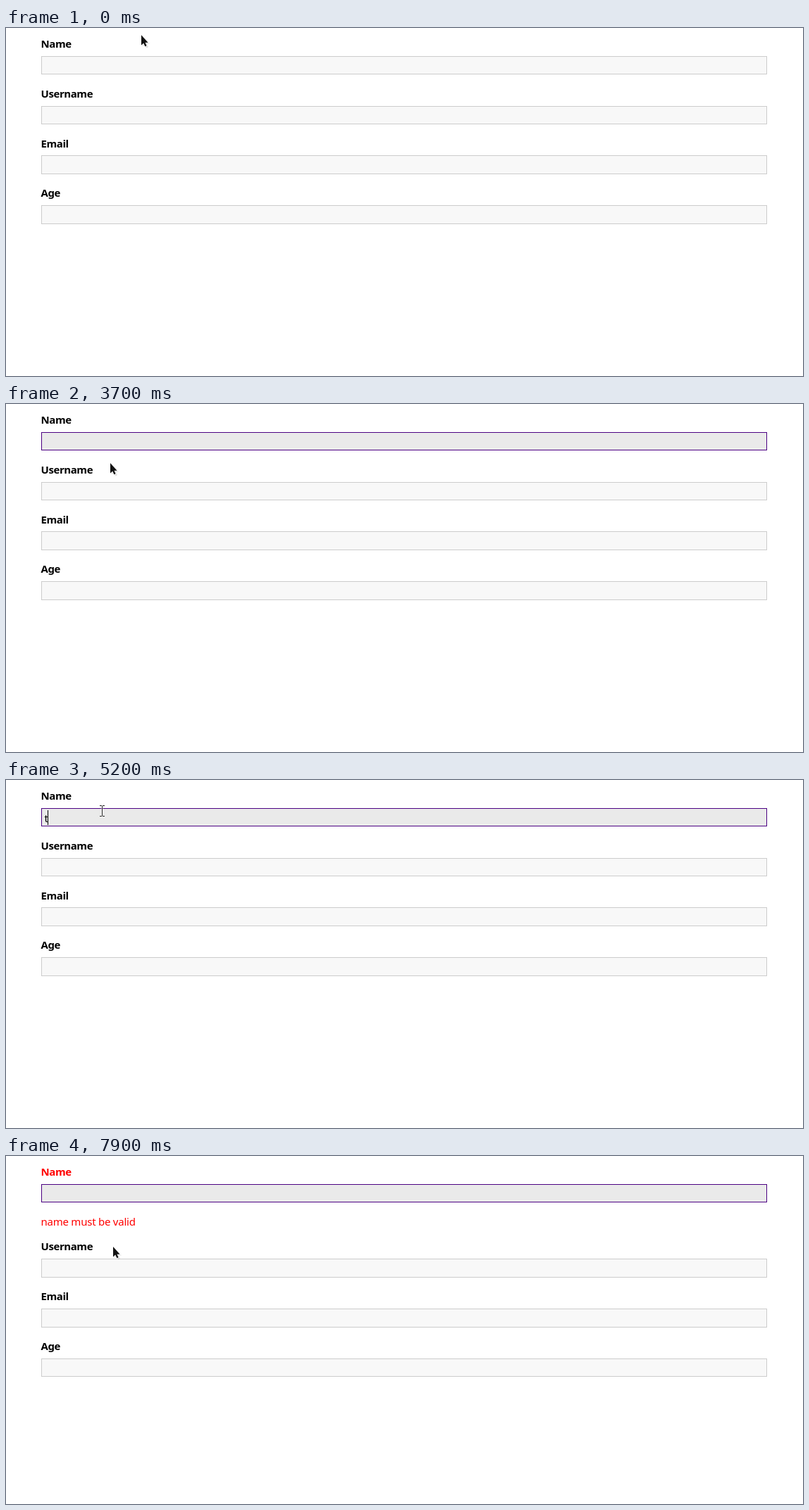
An HTML page that plays this animation: 1131x495 px, repeating every 8 s.

```html
<!DOCTYPE html>
<html lang="en">
<head>
<meta charset="utf-8">
<title>Form validation</title>
<style>
  html, body { margin: 0; width: 100%; height: 100%; overflow: hidden; background: #fff; }
  svg { display: block; width: 1131px; height: 495px; }
  text { font: 15px "Noto Sans", "Open Sans", sans-serif; letter-spacing: -.24px; }
  .label { font-weight: 700; letter-spacing: -.42px; }
  .field { fill: #f8f8f8; stroke: #ccc; }
  .focus .field.first { fill: #eaeaea; stroke: #4b0082; }
  .error { fill: red; visibility: hidden; }
  .invalid .error { visibility: visible; }
  .invalid .label.first { fill: red; }
</style>
</head>
<body>
<svg id="stage" viewBox="0 0 1131 495">
  <g id="form"></g>
  <text class="error" x="49.5" y="99">name must be valid</text>
  <text id="value" x="54.5" y="60"></text>
  <rect id="caret" y="43" width="1" height="21"/>
  <g id="arrow">
    <path d="M2 2V16L5 13.5 7.5 18.5 10 17 8 12.5H12Z" fill="#000" opacity=".13"/>
    <path d="M0 0V14.5L3.2 11.5 5.4 16.3 7.6 15.3 5.5 10.7H9.6Z" fill="#111" stroke="#fff" stroke-width="1.6" paint-order="stroke"/>
  </g>
  <g id="beam" fill="none">
    <path d="M-3 -7.5H0M1 -7.5H4M.5 -7V7M-3 7.5H0M1 7.5H4" stroke="#fff" stroke-width="2.4" opacity=".7"/>
    <path d="M-3 -7.5H0M1 -7.5H4M.5 -7V7M-3 7.5H0M1 7.5H4" stroke="#222"/>
  </g>
</svg>
<script>
const LOOP = 8000, PITCH = 70.8, SHIFT = 35.6;
const $ = id => document.getElementById(id);
const caretX = [54, 59, 68, 75, 80];

function add(tag, attrs, text = "") {
  const el = document.createElementNS("http://www.w3.org/2000/svg", tag);
  for (const k in attrs) el.setAttribute(k, attrs[k]);
  el.textContent = text;
  return $("form").appendChild(el);
}

const rows = ["Name", "Username", "Email", "Age"].map((name, i) => {
  const first = i ? "" : " first";
  return {
    label: add("text", { class: "label" + first, x: 49.5 }, name),
    field: add("rect", { class: "field" + first, x: 50.5, width: 1029 })
  };
});

function layout(invalid) {
  rows.forEach(({ label, field }, i) => {
    const dy = i * PITCH + (invalid && i ? SHIFT : 0);
    const top = Math.round(39.7 + dy), bottom = Math.round(66.45 + dy);
    label.setAttribute("y", Math.round(28 + dy));
    field.setAttribute("y", top + .5);
    field.setAttribute("height", bottom - top - 1);
  });
}

// Pointer track: time, shape, x, y
const pointer = [
  [0, "arrow", 192, 10], [300, "arrow", 186, 16], [400, "arrow", 169, 31],
  [500, "beam", 155, 50], [600, "beam", 147, 60],
  [3200, "beam", 147, 59], [3300, "arrow", 147, 69], [3400, "arrow", 147, 76],
  [3500, "arrow", 148, 82], [3700, "arrow", 148, 84], [3800, "arrow", 141, 74],
  [4100, "beam", 139, 58], [4200, "beam", 136, 48], [4300, "beam", 136, 43],
  [4500, "beam", 136, 44], [5500, "beam", 141, 52], [5600, "beam", 145, 59],
  [5900, "beam", 147, 61], [6000, "arrow", 167, 69], [6300, "arrow", 167, 70],
  [6400, "arrow", 166, 69], [7600, "arrow", 164, 92], [7700, "arrow", 159, 130],
  [7800, "arrow", 154, 143], [7900, "arrow", 152, 129]
];
// Typed characters: time, count
const typing = [
  [0, 0], [1400, 1], [1500, 2], [1600, 3], [1700, 4],
  [2600, 3], [2700, 2], [2800, 1], [2900, 0],
  [5100, 1], [5400, 2], [5500, 3], [5600, 4],
  [6800, 3], [6900, 2], [7200, 1], [7300, 0]
];
// Spans in which each state is on
const caretOn = [[700, 1300], [1400, 2100], [2500, 3400], [4500, 5000], [5100, 6200], [6700, 7400]];
const focusOn = [[700, 3800], [4500, LOOP]];
const invalidOn = [[3800, 5100], [7300, LOOP]];

const at = (track, t) => track.findLast(k => k[0] <= t);
const within = (spans, t) => spans.some(([a, b]) => t >= a && t < b);
const show = (id, on) => $(id).setAttribute("visibility", on ? "visible" : "hidden");

function draw(t) {
  const invalid = within(invalidOn, t), count = at(typing, t)[1];
  const [, shape, x, y] = at(pointer, t);
  layout(invalid);
  $("stage").classList.toggle("focus", within(focusOn, t));
  $("stage").classList.toggle("invalid", invalid);
  $("value").textContent = "test".slice(0, count);
  $("caret").setAttribute("x", caretX[count]);
  show("caret", within(caretOn, t));
  for (const id of ["arrow", "beam"]) show(id, id === shape);
  $(shape).setAttribute("transform", `translate(${x} ${y})`);
}

const start = performance.now();
function tick() {
  draw((performance.now() - start) % LOOP);
  requestAnimationFrame(tick);
}
tick();
</script>
</body>
</html>
```
